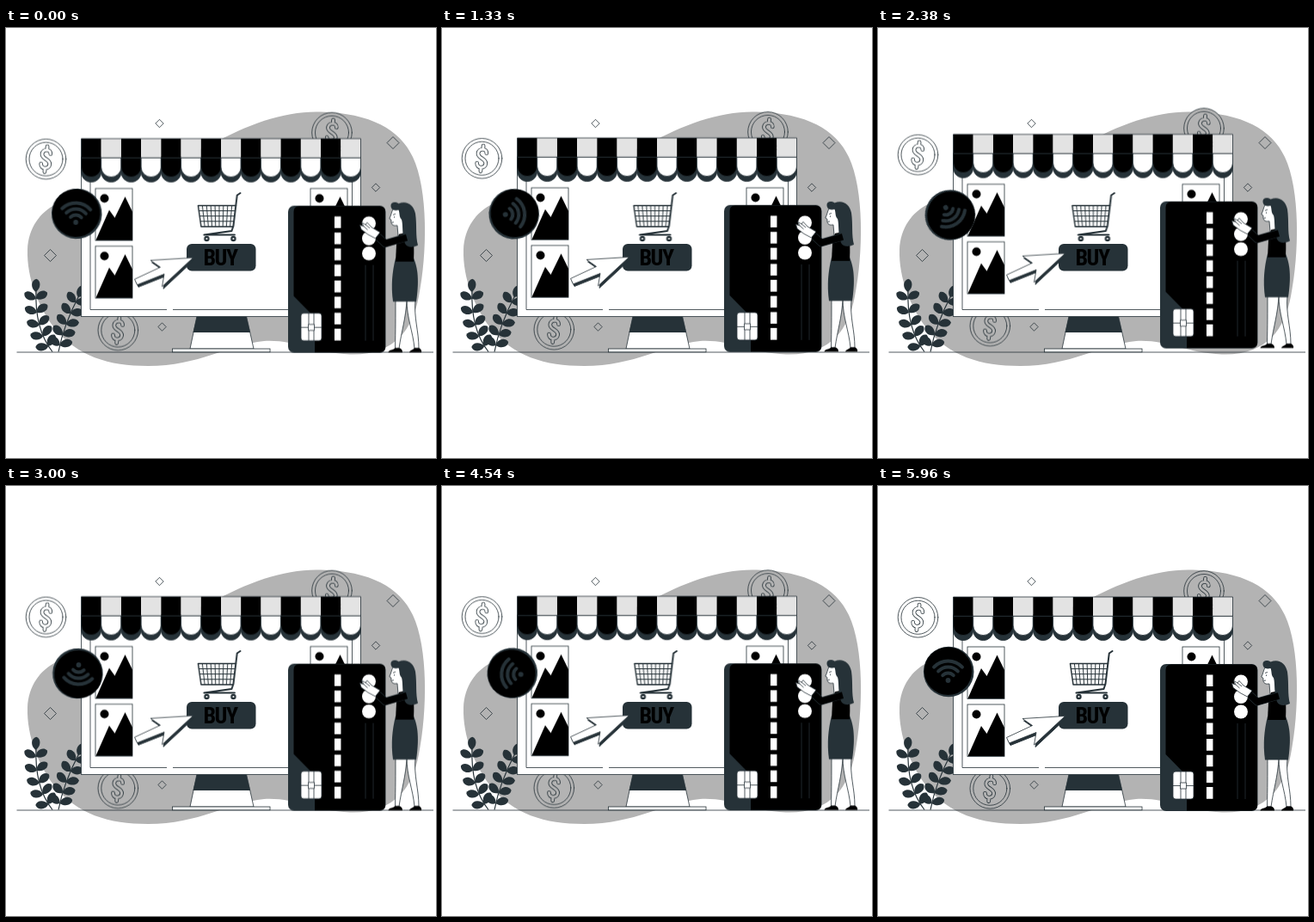
Animation, 500 px wide and 500 px high, one loop 6000 ms. Source, as an HTML page:

```html
<!DOCTYPE html>
<html lang="en">
<head>
<meta charset="utf-8">
<title>Online shopping</title>
<style>
  html, body { margin: 0; width: 100%; height: 100%; overflow: hidden; background: #fff; }
  svg { display: block; width: 100vw; height: 100vh; }
  .line { fill: none; stroke: #263238; stroke-width: .8; }
  .paper { fill: #fff; stroke: #263238; stroke-width: .8; }
  .slate { fill: #263238; }
  .rod { fill: none; stroke: #263238; stroke-width: 2; stroke-linecap: round; stroke-linejoin: round; }
  .float { animation: float 1.5s linear -40ms infinite; }
  .sway { animation: sway 3s linear -40ms infinite; }
  .spin { animation: spin 6s linear -40ms infinite; transform-origin: 82.8px 217px; }
  @keyframes float { 50% { transform: translateY(-7px); } }
  @keyframes sway {
    25% { transform: translateX(-3px); }
    75% { transform: translateX(3px); }
  }
  @keyframes spin { to { transform: rotate(360deg); } }
  .buy { font: 700 26px "Roboto Condensed", Roboto, sans-serif; font-stretch: condensed; letter-spacing: -1.5px; }
</style>
</head>
<body>
<svg viewBox="0 0 500 500">
  <defs>
    <path id="dollar" d="M5.300 -6C5.800 -12 -3.500 -12 -4.500 -6C-5 0 4.800 0 4.300 6C3.800 12 -6.300 12 -5.800 5.500M1.300 -11L1.600 -14.800M-1.300 11L-1.600 14.800"/>
    <g id="picture">
      <rect class="paper" width="43" height="60.500"/>
      <circle cx="10.500" cy="11.500" r="5"/>
      <path d="M.5 60L16 25L22.500 34L34.500 9.500L43 27V60Z"/>
    </g>
    <path id="arrow" d="M217.500 267.500L168 270.500L179.500 278.500L149.500 292.500L152.500 299L184 286.500L181.500 301Z"/>
  </defs>

  <path fill="#b3b3b3" d="M238 136C282 111 326 96 366 97.500C424 99 458 118 473 150C491 188 490 262 480 312C473 350 452 381 400 379.500C358 378 336 362 300 364C258 368 225 393 165 393C120 393 82 382 55 347C38 325 24 290 25 258C26 232 40 214 58 205C75 195 90 190 112 185Z"/>
  <g id="diamonds" class="line"></g>
  <g id="coins" class="float"></g>
  <g id="plants"></g>

  <!-- monitor -->
  <path class="line" d="M12.500 377H497"/>
  <path class="paper" d="M222 335H279.500L288 373H214Z"/>
  <path class="slate" d="M222 335H279.500L284 354H217.500Z"/>
  <rect class="paper" x="193.500" y="373" width="113.500" height="3.800"/>
  <rect class="paper" x="87.500" y="150" width="325" height="185.500"/>
  <path class="line" d="M98 150V327.500H187M194 327.500H402.500V150"/>

  <g class="float">
    <use href="#picture" x="104" y="187"/>
    <use href="#picture" x="104" y="254"/>
    <use href="#picture" x="354" y="187"/>
  </g>
  <g id="awning" class="float"></g>

  <rect class="slate" x="210" y="251" width="80.500" height="31.500" rx="6"/>
  <text class="buy" x="249" y="276.300" text-anchor="middle">BUY</text>

  <g class="sway">
    <path id="mesh" class="line" style="stroke-width:1"/>
    <path class="rod" d="M272.500 192L268.800 194.500L264.500 230L262.500 236L230.500 240.500H266"/>
    <path class="rod" style="stroke-width:1.500" d="M267.500 206.500H223.500L227 231H264.500"/>
    <circle class="slate" cx="233.500" cy="245" r="3.200"/>
    <circle class="slate" cx="264.500" cy="245" r="3.200"/>
    <g fill="#fff"><circle cx="233.500" cy="245" r="1"/><circle cx="264.500" cy="245" r="1"/></g>
  </g>

  <g class="float">
    <use href="#arrow" class="slate" stroke="#263238" x="1.500" y="2.500"/>
    <use href="#arrow" class="paper"/>
  </g>

  <!-- contactless badge -->
  <g class="spin">
    <circle class="slate" cx="82.200" cy="216" r="29.300"/>
    <circle cx="81.500" cy="215.200" r="27.800"/>
    <circle class="slate" cx="81.500" cy="226" r="2.900"/>
    <path id="waves" class="rod" style="stroke-width:4"/>
  </g>

  <!-- bank card -->
  <g class="float">
    <rect class="slate" x="328" y="207" width="113.500" height="171" rx="7"/>
    <path d="M341 207.500H434.500Q441 207.500 441 214V371Q441 377.500 434.500 377.500H359V337L334.500 312V214Q334.500 207.500 341 207.500Z"/>
    <path stroke="#fff" stroke-width="7.500" stroke-dasharray="13.600 5.050" d="M385.700 219.500V364"/>
    <path class="line" d="M418 276V364M427 276V364"/>
    <rect class="paper" x="343" y="332" width="24" height="32" rx="3"/>
    <path class="line" d="M343 348.500H351.500M358.500 348.500H367M351.500 345H358.500V352H351.500ZM352 345V332M358 345V332M352 352V364M358 352V364"/>
    <g fill="#fff">
      <circle cx="422" cy="227.500" r="8"/>
      <circle cx="422" cy="245" r="8"/>
      <circle cx="422" cy="262.500" r="8"/>
    </g>
  </g>

  <!-- shopper -->
  <g class="float">
    <path class="paper" d="M466 316H476C474 338 480 352 480 373H475C473 352 466 338 466 316Z"/>
    <path class="paper" d="M453 316H466C465 338 460 352 457 373H452.500C453 350 453 338 453 316Z"/>
    <path d="M444.500 377.500C445 374.500 450 375 452.500 372.500H457.500C461 374 461 376 461 377.500Z"/>
    <path d="M469 377.500C469.500 375 473 375 475 372.500H480.500C483 374 483.500 376 483 377.500Z"/>
    <path class="slate" d="M453 268H474C479 280 480.500 294 477 318.500H450C447.500 300 449 284 453 268Z"/>
    <path class="paper" d="M450 211C448 215 448 218 445.800 222L448 223.500C447.500 228 449 231 455 230L456 242L465 241L464 222L460 211Z"/>
    <path class="line" d="M450 217.500L453 216.500M448.500 226.500L451 226M451.500 219.500V221"/>
    <path d="M457 240L467 238C474 240 475 250 474 272H453L454 252Z"/>
    <path class="slate" d="M448.500 210.500C445 204 451 201 456.500 204.500C466 200.500 474 206 476 216C478 230 476 242 479 253C473 256 466 255.500 464 251C460 240 462 230 460 223C457 221 458 215 456.500 212C453 213 450.500 212.500 448.500 210.500Z"/>
    <path class="line" style="stroke-width:9;stroke-linejoin:round" d="M465 244L441 251L432.500 243"/>
    <path fill="none" stroke="#000" stroke-width="7.800" stroke-linejoin="round" d="M466 244L441 251L432.500 243"/>
    <path class="paper" d="M435 238L429.500 245L421 240.500L413 234.500L411.500 229.500L416 231L413.500 226.500L418 229L420 226.500L425 232Z"/>
    <path class="line" d="M416 231L420.500 235M418 229L423 233"/>
  </g>
</svg>

<script>
const NS = 'http://www.w3.org/2000/svg';
const $ = id => document.getElementById(id);

function add(parent, tag, attrs) {
  const el = parent.appendChild(document.createElementNS(NS, tag));
  for (const name in attrs) el.setAttribute(name, attrs[name]);
  return el;
}

// Diamonds: centre and half size
for (const [x, y, r] of [[178.5, 111, 4.7], [450, 133.5, 7], [430, 185.5, 4.7], [51.5, 264.5, 7], [181.5, 347.5, 4.7]])
  add($('diamonds'), 'path', { d: `M${x - r} ${y}l${r} ${-r}l${r} ${r}l${-r} ${r}Z` });

for (const [x, y, fill] of [[46.5, 152.8, '#fff'], [379, 122, '#b3b3b3'], [130.3, 351.8, '#b3b3b3']]) {
  const coin = add($('coins'), 'g', { transform: `translate(${x} ${y})`, fill: 'none', 'stroke-linecap': 'round' });
  for (const r of [23.3, 19.5])
    add(coin, 'circle', { r, fill, stroke: '#263238', 'stroke-width': .8 });
  add(coin, 'use', { href: '#dollar', stroke: '#263238', 'stroke-width': 4.6 });
  add(coin, 'use', { href: '#dollar', stroke: fill, 'stroke-width': 3 });
}

// A curved stem with pairs of leaves and one at the tip
function plant(x0, y0, cx, cy, x1, y1) {
  const g = add($('plants'), 'g', { class: 'slate' });
  add(g, 'path', { class: 'line', style: 'stroke-width:1.2', d: `M${x0} ${y0}Q${cx} ${cy} ${x1} ${y1}` });
  const leaf = (t, side) => {
    const u = 1 - t;
    const x = u * u * x0 + 2 * u * t * cx + t * t * x1;
    const y = u * u * y0 + 2 * u * t * cy + t * t * y1;
    const dx = u * (cx - x0) + t * (x1 - cx), dy = u * (cy - y0) + t * (y1 - cy);
    const turn = Math.atan2(dy, dx) * 180 / Math.PI + side * 62;
    add(g, 'path', { d: 'M0 0C3 -6.500 13 -7 15 0C13 6 4 5.500 0 0Z', transform: `translate(${x} ${y}) rotate(${turn})` });
  };
  for (let i = 0; i < 5; i++) {
    leaf(.12 + i * .19, -1);
    leaf(.12 + i * .19, 1);
  }
  leaf(.97, 0);
}
plant(54, 376.5, 33, 350, 35, 304);
plant(61, 376.5, 67, 345, 85, 311);

// Awning: shadow scallops first, then the stripes
const STRIPES = 14, WIDTH = 325 / STRIPES, TOP = 129, FOLD = 151.3;
const scallop = (i, drop, fill) => {
  const x = 87.5 + i * WIDTH, r = WIDTH / 2;
  add($('awning'), 'path', {
    d: `M${x} ${FOLD}V${162 + drop}a${r} ${r} 0 0 0 ${WIDTH} 0V${FOLD}Z`,
    fill, stroke: '#263238', 'stroke-width': .8
  });
};
for (let i = 0; i < STRIPES; i++) scallop(i, 6, '#263238');
for (let i = 0; i < STRIPES; i++) {
  scallop(i, 0, i % 2 ? '#fff' : '#000');
  add($('awning'), 'rect', { x: 87.5 + i * WIDTH, y: TOP, width: WIDTH, height: FOLD - TOP, fill: i % 2 ? '#e3e3e3' : '#000' });
}
add($('awning'), 'path', { class: 'line', d: `M87.5 ${TOP}H412.5V${FOLD}H87.5Z` });

// Basket wires
let mesh = '';
for (let i = 1; i < 9; i++) mesh += `M${223.5 + i * 4.9} 206.5L${227 + i * 4.2} 231`;
for (let i = 1; i < 4; i++) mesh += `M${223.5 + i * .9} ${206.5 + i * 6.1}H${267.3 - i * .7}`;
$('mesh').setAttribute('d', mesh);

$('waves').setAttribute('d', [8.5, 15.5, 22.5].map(r => {
  const w = r * Math.sin(.82), y = 226 - r * Math.cos(.82);
  return `M${81.5 - w} ${y}A${r} ${r} 0 0 1 ${81.5 + w} ${y}`;
}).join(''));
</script>
</body>
</html>
```
